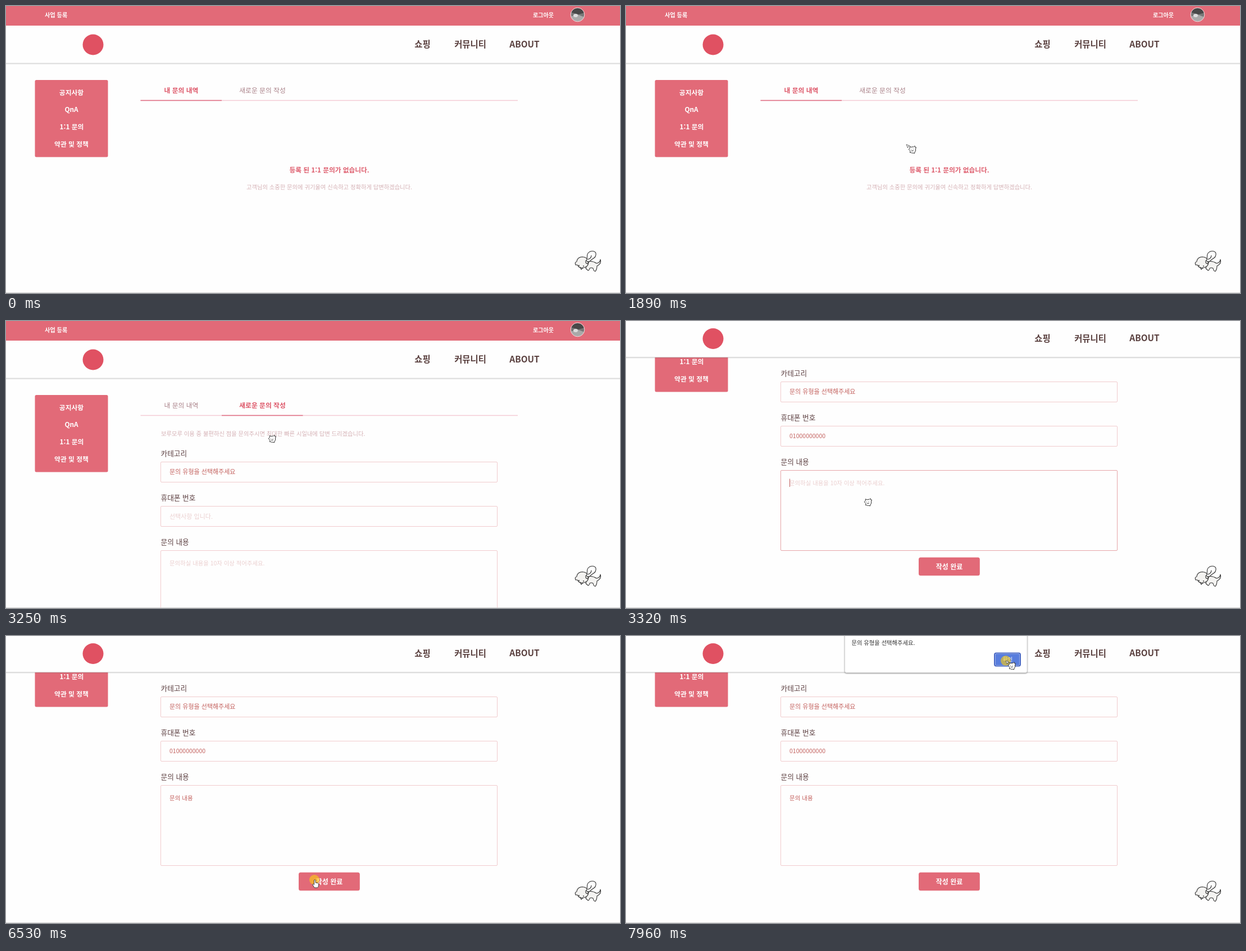
Recreate the animation shown at these times as an HTML page. Size 1093 px wide and 512 px high, loop 8000 ms.

```html
<!DOCTYPE html>
<html lang="ko">
<head>
<meta charset="utf-8">
<title>1:1 문의</title>
<style>
  html, body { margin: 0; height: 100%; overflow: hidden; background: #fefefe; }
  svg { display: block; width: 100%; height: 100%; }
  text { font-family: "Noto Sans CJK KR", "Noto Sans CJK", "Noto Sans KR", sans-serif; white-space: pre; }
  .mid { text-anchor: middle; }
  .bold { font-weight: 700; }
  .white { fill: #fff; }
  .nav { font-size: 15.4px; font-weight: 700; fill: #5a403f; }
  .menu { font-size: 11.8px; font-weight: 700; fill: #fff; }
  .tab { font-size: 11.8px; fill: #a98088; }
  .tab.on { font-weight: 700; fill: #dd5466; }
  .label { font-size: 12.7px; fill: #5c3f41; }
  .entry { font-size: 10.5px; fill: #c3605d; }
  .hint { font-size: 10.4px; fill: #ebcfcf; }
  .soft { font-size: 10.3px; fill: #d5b1b5; }
  .field { fill: none; stroke: #f1cbcd; }
  .field.focus { stroke: #e6a5a8; }
  .rose { fill: #e26a78; }
  .ink { fill: #fff; stroke: #333; stroke-linejoin: round; stroke-linecap: round; }
  #header .panel { filter: drop-shadow(0 1px 1px #0003); }
  #alert .panel { filter: drop-shadow(0 1px 1px #0006); }
</style>
</head>
<body>
<svg viewBox="0 0 1093 512">
  <rect width="1093" height="512" fill="#fefefe"/>

  <g id="page">
    <rect class="rose" x="51.500" y="132" width="130" height="137.600" rx="2.500"/>
    <g class="mid">
      <text class="menu" x="116.500" y="159">공지사항</text>
      <text class="menu" x="116.500" y="189">QnA</text>
      <text class="menu" x="117" y="220">1:1 문의</text>
      <text class="menu" x="116.500" y="251">약관 및 정책</text>
    </g>

    <path d="M239.500 168.500H911" stroke="#f3cbd4" stroke-width="1.500"/>
    <path id="tabLine" d="M239.500 168.500h144.500" stroke="#df6c82" stroke-width="1.500"/>
    <text id="listTab" class="tab mid" x="312" y="154.500">내 문의 내역</text>
    <text id="formTab" class="tab mid" x="456.500" y="154.500">새로운 문의 작성</text>

    <g id="list" class="mid">
      <text class="bold" x="575.500" y="297" font-size="11.700" fill="#de5d6d">등록 된 1:1 문의가 없습니다.</text>
      <text class="soft" x="575.500" y="326.500">고객님의 소중한 문의에 귀기울여 신속하고 정확하게 답변하겠습니다.</text>
    </g>

    <g id="form">
      <text class="soft" x="276" y="205">보루모루 이용 중 불편하신 점을 문의주시면 최대한 빠른 시일내에 답변 드리겠습니다.</text>
      <text class="label" x="275.500" y="240.500">카테고리</text>
      <rect class="field" x="275.500" y="251.500" width="599" height="36" rx="1.500"/>
      <text class="entry" style="font-size:11px" x="291" y="273">문의 유형을 선택해주세요</text>
      <text class="label" x="275.500" y="319.500">휴대폰 번호</text>
      <rect class="field" x="275.500" y="330.500" width="599" height="36" rx="1.500"/>
      <text id="phoneHint" class="hint" style="font-size:11px" x="291" y="352.500">선택사항 입니다.</text>
      <text id="phone" class="entry" x="291" y="352">01000000000</text>
      <text class="label" x="275.500" y="399">문의 내용</text>
      <rect id="area" class="field" x="275.500" y="409.500" width="599" height="143" rx="1.500"/>
      <text id="areaHint" class="hint" x="291" y="435.500">문의하실 내용을 10자 이상 적어주세요.</text>
      <text id="typed" class="entry" x="291" y="435.500"></text>
      <path id="underline" stroke="#cb7673"/>
      <path id="caret" stroke="#c0605f"/>
      <rect class="rose" x="521" y="564.700" width="108.800" height="32.500" rx="3.500"/>
      <text class="bold white mid" x="575.500" y="585.500" font-size="12">작성 완료</text>
    </g>
  </g>

  <g id="header">
    <rect class="panel" x="-5" y="35" width="1103" height="67" fill="#fefefe"/>
    <path d="M0 102.200H1093" stroke="#d6d6d6"/>
    <rect class="rose" width="1093" height="35"/>
    <text class="bold white" x="69" y="20" font-size="10.200">사업 등록</text>
    <text class="bold white" x="938" y="20" font-size="10.100">로그아웃</text>
    <clipPath id="round"><circle cx="1017.500" cy="15.500" r="12"/></clipPath>
    <g clip-path="url(#round)">
      <rect x="1005" y="3" width="25" height="25" fill="#777"/>
      <path d="M1005 3h25v9l-11 3-14-4z" fill="#484848"/>
      <path d="M1005 19l12-4 13 5v8h-25z" fill="#a9a9a9"/>
      <ellipse cx="1014" cy="17" rx="4" ry="3" fill="#ddd"/>
    </g>
    <circle cx="1017.500" cy="15.500" r="12.300" fill="none" stroke="#f5dfe2"/>
    <circle cx="155" cy="69" r="18.500" fill="#e05162"/>
    <g class="mid">
      <text class="nav" x="741.500" y="74">쇼핑</text>
      <text class="nav" x="826.500" y="74">커뮤니티</text>
      <text class="nav" x="923" y="73.500">ABOUT</text>
    </g>
  </g>

  <path d="M0 511.500H1093" stroke="#d2d2d2"/>

  <g id="dog" class="ink" stroke-width="1.100">
    <path d="M1036 456Q1044 454 1051 459Q1058 458 1058 452Q1061 459 1052 464Q1052 470 1049 473.500Q1046 473 1045 468Q1042 466 1039 468Q1038 473 1035 471L1032 468Z" fill="#f4f3f1"/>
    <path d="M1014 462Q1012 457 1016 456Q1017 448 1026 447.500Q1035 448 1037 456Q1037 464 1031 466Q1024 469 1019 465Q1018 461 1014 462Z" fill="#f4f3f1"/>
    <path d="M1033 454C1036 450 1033 445 1036 441C1040 436 1048 436 1050 441C1051 446 1047 450 1043 452C1040 454 1039 457 1036 457Z"/>
    <path d="M1035 452Q1042 451 1042 445M1032 454Q1031 459 1035 460Q1038 457 1037 455M1022 466l2 4 3-3" fill="none"/>
    <path d="M1020 463h.1M1028 464h.1" stroke-width="1.800"/>
  </g>

  <g id="alert">
    <rect class="panel" x="389.500" y="-5" width="324.500" height="70.500" rx="3" fill="#fff" stroke="#ccc" stroke-width=".700"/>
    <text x="401.500" y="16" font-size="10.300" fill="#333">문의 유형을 선택해주세요.</text>
    <rect x="656" y="30.500" width="46" height="23" rx="3" fill="#dfe7fb" stroke="#4968c4" stroke-width="2"/>
    <rect x="657.500" y="32" width="43" height="20" rx="1.500" fill="#587ddd"/>
    <text class="white mid" x="679.500" y="45" font-size="9.500">확인</text>
  </g>

  <circle id="click" r="9" fill="#facd14" fill-opacity=".620"/>
  <g id="cursor">
    <g id="pet" class="ink" stroke-width="1">
      <path d="M6 7L6.500 3.500 9 5Q11 3.500 13 4.500L15 2.500 15.500 5 17.500 5 16.500 8Q17.500 11 15 14L14.500 16 12 15Q10 16 8.500 14.500L6.500 14.500 7 11.500 4.500 9Z"/>
      <path d="M8.500 9h.1M12 8h.1M9.500 11.500l3-.5" fill="none"/>
    </g>
    <path id="arrow" class="ink" d="M0 0L6 2.500 3.500 3.500 2.500 6Z" stroke-width=".800" stroke-dasharray="1.500 1"/>
    <path id="hand" class="ink" stroke-width=".900" d="M0 0Q1.500-1 2 1V5Q6 5 7.500 7V10Q7 13 5.500 14H0Q-2 11-3.500 8Q-2.500 6.500-.5 8.500V1Z"/>
  </g>
</svg>

<script>
const LOOP = 8000, OPEN_FORM = 2900, SCROLL = 3320, BLUR = 6460, ALERT = 6660;
const $ = id => document.getElementById(id);
const show = (id, on) => $(id).setAttribute("display", on ? "inline" : "none");

// Pointer moves: start, end, increments, from x, y, to x, y
const moves = [
  [1130, 1890, 11, 1053, 500, 499, 247],
  [1890, 2310, 6, 499, 247, 442, 147],
  [3050, 3250, 3, 442, 147, 463, 201],
  [SCROLL, SCROLL + 1, 1, 420, 314, 420, 314],
  [6050, BLUR, 6, 420, 314, 549, 435],
  [6870, 7750, 13, 549, 435, 674, 38],
  [7750, 7820, 1, 674, 38, 683, 46],
  [7820, 7890, 1, 683, 46, 676, 44],
];
const clicks = [[2700, OPEN_FORM], [BLUR, ALERT], [7890, LOOP]];
const typing = [
  [SCROLL, ""], [3590, "ㅁ"], [3720, "무"], [3980, "문"],
  [4120, "문ㅇ"], [4190, "문의"], [4320, "문의 "], [4390, "문의 ㄴ"], [4520, "문의 내"],
  [4660, "문의 냉"], [4720, "문의 내요"], [4790, "문의 내용"],
];

function pointerAt(t) {
  const [start, end, count, x0, y0, x1, y1] = moves.findLast(m => t >= m[0]) || moves[0];
  const p = Math.min(1, Math.floor((t - start) / (end - start) * count + 0.1) / count);
  const eased = p * (1.6 - 0.6 * p);
  return [x0 + (x1 - x0) * eased, y0 + (y1 - y0) * eased];
}

function drawTyping(t) {
  const text = typing.findLast(k => t >= k[0])?.[1] ?? "";
  const focused = t >= SCROLL && t < BLUR;
  const typed = $("typed");
  const widthOf = s => {
    typed.textContent = s;
    return s ? typed.getComputedTextLength() : 0;
  };
  const from = 291 + widthOf(text.slice(0, -1));
  const to = 291 + widthOf(text);
  const caretOn = t < 5320 || (t >= 5850 && t < 6380);
  $("underline").setAttribute("d", `M${from} 438.500H${to}`);
  $("caret").setAttribute("d", `M${to + 0.5} 424.500v14.500`);
  show("underline", focused && text && !text.endsWith(" "));
  show("caret", focused && caretOn);
  show("areaHint", !text);
  $("area").classList.toggle("focus", focused);
}

function draw(t) {
  const formOpen = t >= OPEN_FORM, scrolled = t >= SCROLL;
  show("list", !formOpen);
  show("form", formOpen);
  $("listTab").classList.toggle("on", !formOpen);
  $("formTab").classList.toggle("on", formOpen);
  $("tabLine").setAttribute("transform", `translate(${formOpen ? 144.5 : 0})`);
  $("page").setAttribute("transform", `translate(0 ${scrolled ? -143 : 0})`);
  $("header").setAttribute("transform", `translate(0 ${scrolled ? -37.5 : 0})`);
  show("phone", scrolled);
  show("phoneHint", !scrolled);
  drawTyping(t);

  show("alert", t >= ALERT);
  $("alert").setAttribute("opacity", Math.min(1, Math.max(0, (t - ALERT + 70) / 210)));

  const [x, y] = pointerAt(t);
  const hand = (t >= 2240 && t < 3120) || (t >= 6390 && t < ALERT);
  const overForm = t >= 3120 && t < 6390;
  show("cursor", t >= 1130);
  show("hand", hand);
  show("pet", !hand);
  show("arrow", !hand && !overForm);
  $("cursor").setAttribute("transform", `translate(${x} ${y})`);
  show("click", clicks.some(([start, end]) => t >= start && t < end));
  $("click").setAttribute("transform", `translate(${x} ${y})`);
}

const began = performance.now();
function tick() {
  draw((performance.now() - began) % LOOP);
  requestAnimationFrame(tick);
}
tick();
</script>
</body>
</html>
```
